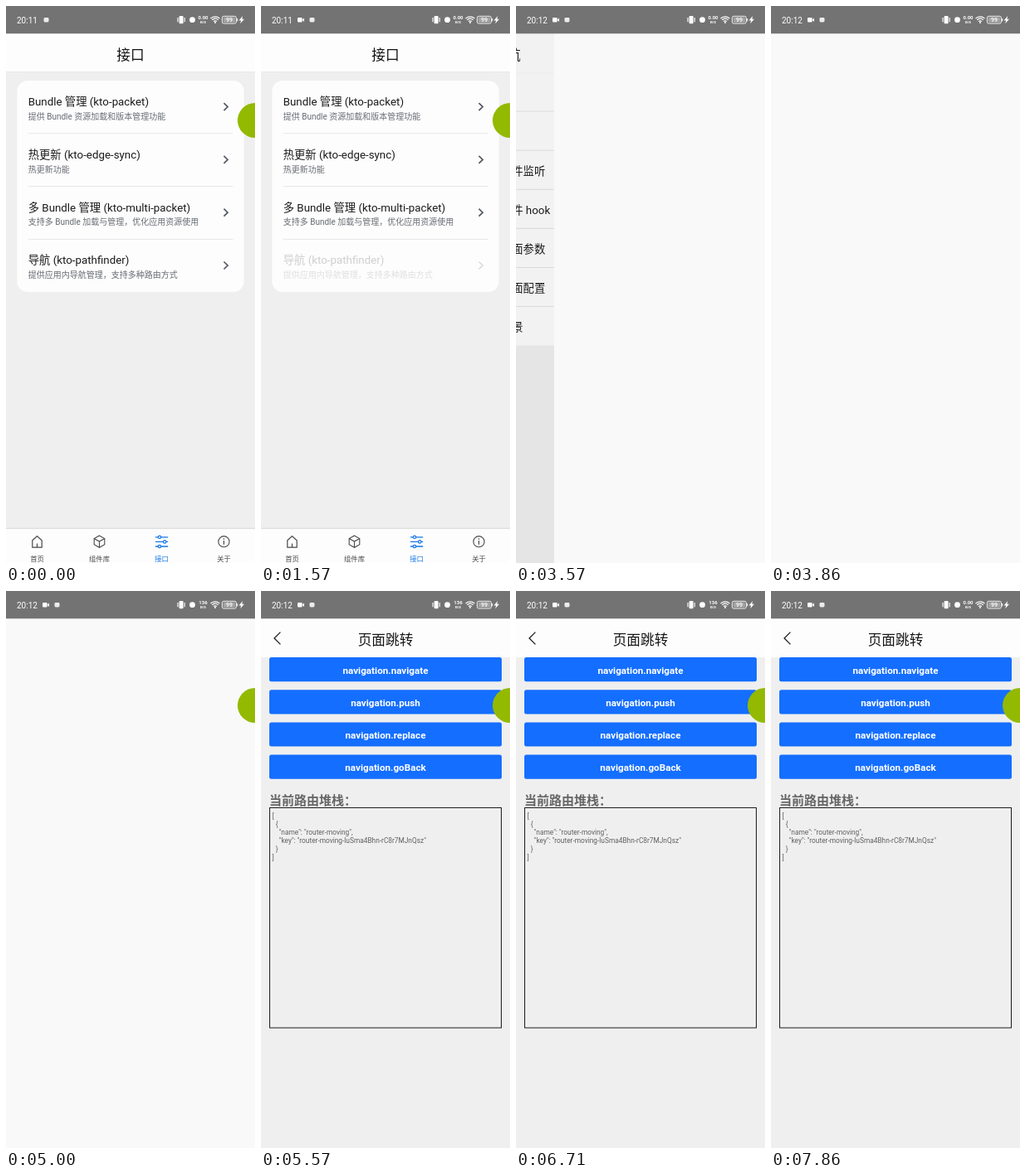
These frames come from a looping animation (300x672 px, 8 s). An HTML page with a canvas:

```html
<!DOCTYPE html>
<html lang="zh-CN">
<head>
<meta charset="utf-8">
<title>接口</title>
<style>
html, body { margin: 0; width: 100%; height: 100%; overflow: hidden; background: #efefef; }
canvas { display: block; width: 300px; height: 672px; }
</style>
</head>
<body>
<canvas id="stage"></canvas>
<script>
const W = 300, H = 672, LOOP = 8000, FPS = 7;
const FONT = 'Roboto, "Noto Sans CJK SC", "Noto Sans CJK", sans-serif';
const WHITE = '#fdfdfd', GREY = '#efefef', INK = '#1b1b1b', BLUE = '#1677e8';

const canvas = document.getElementById('stage');
const ctx = canvas.getContext('2d');
const dpr = window.devicePixelRatio || 1;
canvas.width = W * dpr;
canvas.height = H * dpr;

const clamp = v => Math.max(0, Math.min(1, v));
const ramp = (t, from, to) => clamp((t - from) / (to - from));
const easeInOut = u => u < 0.5 ? 2 * u * u : 1 - 2 * (1 - u) * (1 - u);

// ---------- drawing helpers ----------
function rect(x, y, w, h, color) {
  ctx.fillStyle = color;
  ctx.fillRect(x, y, w, h);
}
function round(x, y, w, h, r, color) {
  ctx.fillStyle = color;
  ctx.beginPath();
  ctx.roundRect(x, y, w, h, r);
  ctx.fill();
}
function disc(x, y, r, color) {
  ctx.fillStyle = color;
  ctx.beginPath();
  ctx.arc(x, y, r, 0, 7);
  ctx.fill();
}
function ring(x, y, r, color, width, fill) {
  if (fill) disc(x, y, r, fill);
  ctx.strokeStyle = color;
  ctx.lineWidth = width;
  ctx.beginPath();
  ctx.arc(x, y, r, 0, 7);
  ctx.stroke();
}
function path(d, color, width) {
  const p = new Path2D(d);
  if (width) {
    ctx.strokeStyle = color;
    ctx.lineWidth = width;
    ctx.stroke(p);
  } else {
    ctx.fillStyle = color;
    ctx.fill(p);
  }
}
// y is the visual middle of the line
function text(str, x, y, size, color, align = 'left', weight = 400) {
  ctx.font = `${weight} ${size}px ${FONT}`;
  ctx.textAlign = align;
  ctx.fillStyle = color;
  ctx.fillText(str, x, y + size * 0.37);
}
function chevron(x, y, color) {
  path(`M${x - 2.5} ${y - 4.5}l4.6 4.5l-4.6 4.5`, color, 1.7);
}
function faded(alpha, draw) {
  ctx.save();
  ctx.globalAlpha *= alpha;
  draw();
  ctx.restore();
}
const pressed = (t, from) => 1 - 0.8 * easeInOut(ramp(t, from, from + 150));

// ---------- status bar ----------
function statusBar(t) {
  const w = '#fff';
  rect(0, 0, W, 33.3, '#737373');
  text(t < 1850 ? '20:11' : '20:12', 13, 16.8, 10, w);

  const recording = t >= 140;
  if (recording) {
    round(44, 14, 5.6, 5.6, 1, w);
    path('M49.5 16.8L52 14.6V19Z', w);
  }
  round(recording ? 58.5 : 45.5, 14, 6, 5.4, 1.4, '#ececec');

  round(208.6, 12, 5, 9.2, 1, w);
  path('M207 14v5.2M215.2 14v5.2', w, 1.1);
  disc(224.5, 16.7, 3.4, w);

  const busy = t >= 4700 && t < 6850;
  text(busy ? '136' : '0.00', 237.5, 13.8, 6, w, 'center', 700);
  text(busy ? 'B/S' : 'B/S', 237.5, 19.4, 4.4, w, 'center', 700);

  for (const r of [2.6, 5.2, 7.6]) {
    ctx.strokeStyle = w;
    ctx.lineWidth = 1.2;
    ctx.beginPath();
    ctx.arc(252, 20.4, r, -Math.PI * 0.76, -Math.PI * 0.24);
    ctx.stroke();
  }
  disc(252, 20, 1, w);

  ctx.strokeStyle = w;
  ctx.lineWidth = 0.9;
  ctx.beginPath();
  ctx.roundRect(260.4, 12.3, 17, 8.8, 2);
  ctx.stroke();
  round(261.7, 13.6, 14.4, 6.2, 1, '#a4a4a4');
  rect(278.2, 15, 1, 3.4, w);
  text('99', 268.9, 16.7, 7, w, 'center', 500);
  path('M285.2 12L280.6 17.4H283.2L282.2 21.2L287 15.7H284.3Z', w);
}

// ---------- first screen ----------
const MODULES = [
  ['Bundle 管理 (kto-packet)', '提供 Bundle 资源加载和版本管理功能'],
  ['热更新 (kto-edge-sync)', '热更新功能'],
  ['多 Bundle 管理 (kto-multi-packet)', '支持多 Bundle 加载与管理，优化应用资源使用'],
  ['导航 (kto-pathfinder)', '提供应用内导航管理，支持多种路由方式']
];

function tabBar() {
  rect(0, 629, W, 1, '#e9e9e9');
  rect(0, 630, W, 1, '#e0e0e0');
  rect(0, 631, W, 41, WHITE);
  const c = '#484848';
  path('M31.8 644.8L37.5 639.6L43.2 644.8V653.2H31.8ZM37.5 648.5V653', c, 1.2);
  path('M112.5 639L118.8 642.5V649.8L112.5 653.3L106.2 649.8V642.5ZM106.2 642.5L112.5 646L118.8 642.5M112.5 646V653.3', c, 1.1);
  path('M180 640.8h15.2M180 646.4h15.2M180 652h15.2', BLUE, 1.3);
  [[185, 640.8], [191.2, 646.4], [185, 652]].forEach(([x, y]) => ring(x, y, 1.7, BLUE, 1.2, WHITE));
  ring(262.5, 646.2, 6.6, c, 1.1);
  path('M262.5 645v4.8M262.5 642.3v1.4', c, 1.2);
  ['首页', '组件库', '接口', '关于'].forEach((label, i) =>
    text(label, 37.5 + 75 * i, 667.2, 8.33, i === 2 ? BLUE : '#4a4a4a', 'center'));
}

function homePage(t) {
  rect(0, 0, W, H, GREY);
  rect(0, 33, W, 46, WHITE);
  rect(0, 79, W, 1, '#e9e9e9');
  text('接口', 150, 59, 16.67, '#111', 'center');
  round(13.3, 90, 273.4, 255, 13, WHITE);
  MODULES.forEach(([name, note], i) => {
    const y = 63.8 * i;
    faded(i === 3 ? pressed(t, 1400) : 1, () => {
      text(name, 26.7, 115 + y, 13.33, INK);
      text(note, 26.7, 133 + y, 10, '#676b72');
      chevron(265, 121.6 + y, '#555a64');
    });
    if (i < 3) rect(26.7, 153.3 + y, 246.6, 0.9, '#e4e4e4');
  });
  tabBar();
}

// ---------- list screen ----------
const TOPICS = ['页面跳转', '页面传参', '生命周期事件监听', '生命周期事件 hook',
  '动态设置页面参数', '动态设置页面配置', '常见开发场景'];

function listPage(t) {
  rect(0, 0, W, H, GREY);
  rect(0, 33, W, 376.6, WHITE);
  rect(0, 80.6, W, 0.8, '#f4f4f4');
  path('M28.3 57H16M21.8 51L15.8 57L21.8 63', '#151515', 1.7);
  text('导航', 57, 59, 16.67, '#222');
  TOPICS.forEach((name, i) => {
    const y = 47.1 * i;
    faded(i === 0 ? pressed(t, 3100) : 1, () => {
      text(name, 13.3, 104.4 + y, 13.33, INK);
      chevron(278, 103.4 + y, '#5c5c74');
    });
    if (i < 6) rect(13.3, 126.6 + y, 273, 0.9, '#e0e0e0');
  });
}

// ---------- detail screen ----------
const STACK = ['[', '  {', '    "name": "router-moving",',
  '    "key": "router-moving-luSma4Bhn-rC8r7MJnQsz"', '  }', ']'];

function detailPage(t) {
  const ready = t >= 5570;
  rect(0, 0, W, H, ready ? GREY : '#f9f9f9');
  if (!ready) return;
  rect(0, 33, W, 47, WHITE);
  path('M23.4 49.6L16 57L23.4 64.4', '#1a1a1a', 1.3);
  text('页面跳转', 150, 59, 16.67, '#151515', 'center');
  ['navigate', 'push', 'replace', 'goBack'].forEach((name, i) => {
    const y = 39.2 * i;
    round(10, 80 + y, 280, 29.2, 2.5, '#146eff');
    text('navigation.' + name, 150, 95.2 + y, 11.67, '#fff', 'center', 700);
  });
  text('当前路由堆栈：', 10, 252, 15, '#666', 'left', 700);
  ctx.strokeStyle = '#1c1c1c';
  ctx.lineWidth = 1;
  ctx.strokeRect(10.5, 261.5, 279, 265.5);
  STACK.forEach((line, i) => text(line, 13.5, 271 + 10 * i, 8.33, '#606060'));
}

// ---------- timeline ----------
function pages(t) {
  if (t < 1850) homePage(t);
  if (t >= 1700 && t < 3930) {
    const p = 1 - Math.pow(1 - ramp(t, 3429, 3929), 5.6);
    ctx.save();
    ctx.translate(-100 * p, 0);
    faded(ramp(t, 1640, 1800), () => listPage(t));
    ctx.restore();
    if (p > 0) {
      rect(0, 0, W, H, `rgba(0,0,0,${0.05 * p})`);
      ctx.save();
      ctx.translate(W * (1 - p), 0);
      detailPage(t);
      ctx.restore();
    }
  }
  if (t >= 3930) detailPage(t);
}

function frame(now) {
  const t = Math.floor((now % LOOP + 5) * FPS / 1000) * 1000 / FPS % LOOP;
  ctx.setTransform(dpr, 0, 0, dpr, 0, 0);
  pages(t);
  if (t < 3500 || t >= 4995) disc(300, 138, 21, '#93b900');
  statusBar(t);
  requestAnimationFrame(frame);
}
requestAnimationFrame(frame);
</script>
</body>
</html>
```
